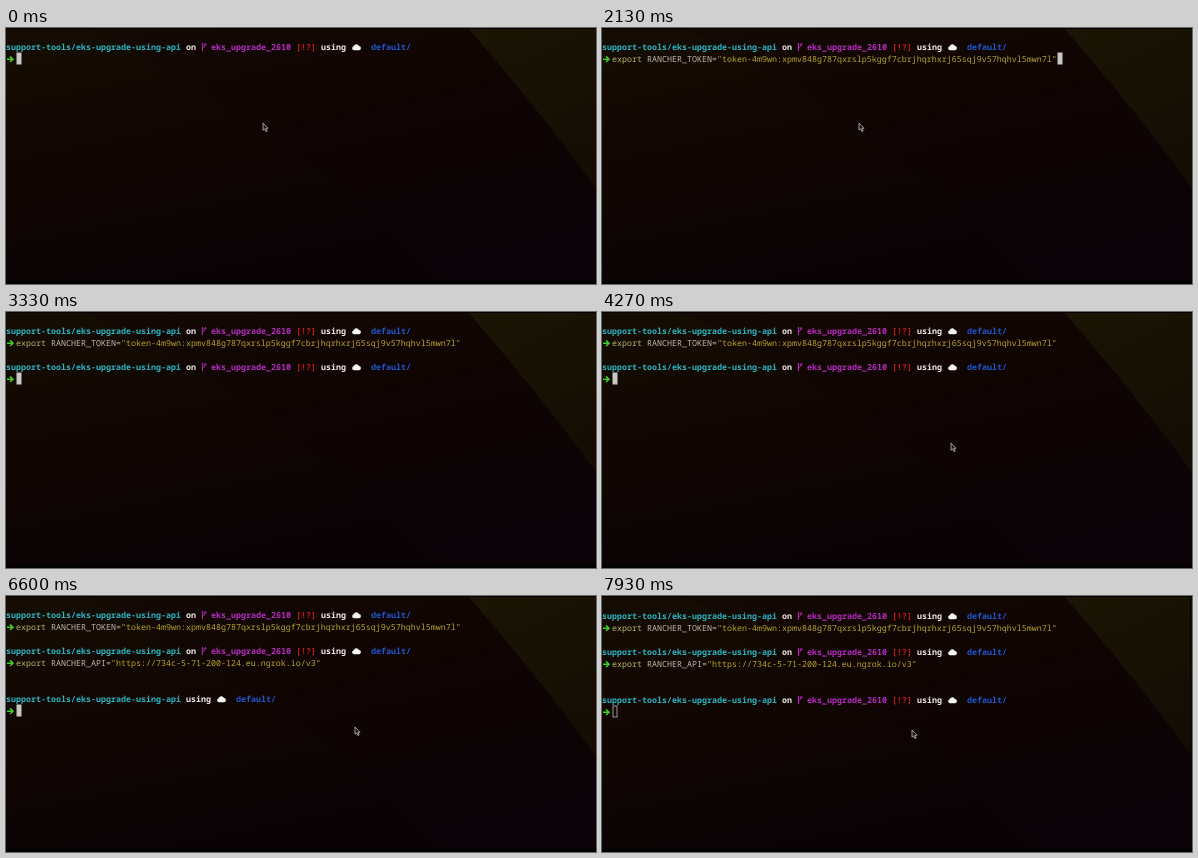
Write an HTML page that moves like this. It is 590 by 256 pixels and loops after 8 s.

```html
<!DOCTYPE html>
<html lang="en">
<head>
<meta charset="utf-8">
<title>Terminal session</title>
<style>
  html, body { margin: 0; width: 100%; height: 100%; overflow: hidden; background: #0d0403; }
  svg { display: block; width: 590px; height: 256px; }
  text {
    font: 8.333px "Noto Sans Mono", "DejaVu Sans Mono", monospace;
    text-rendering: geometricPrecision;
    white-space: pre;
    fill: #bdb6ad;
  }
  .b { font-weight: 700; }
  .dir { fill: #2ab5c4; }
  .white { fill: #eeeaea; }
  .git { fill: #b42cc0; }
  .red { fill: #bd1c16; }
  .blue { fill: #2057d0; }
  .cmd { fill: #b9b674; }
  .str { fill: #b5a52e; }
  .arrow { fill: none; stroke: #3fcf2a; stroke-width: 1.5; }
  .unfocused .arrow { stroke: #16df3a; }
</style>
</head>
<body>
<svg viewBox="0 0 590 256">
  <defs>
    <linearGradient id="left" x2=".35" y2="1">
      <stop offset="0" stop-color="#150d03"/>
      <stop offset=".45" stop-color="#110602"/>
      <stop offset="1" stop-color="#0a0305"/>
    </linearGradient>
    <linearGradient id="mid" x2=".5" y2="1">
      <stop offset="0" stop-color="#140903"/>
      <stop offset=".5" stop-color="#100403"/>
      <stop offset="1" stop-color="#0b0307"/>
    </linearGradient>
    <linearGradient id="right" x2=".4" y2="1">
      <stop offset="0" stop-color="#1a1504"/>
      <stop offset="1" stop-color="#150d04"/>
    </linearGradient>

    <text id="dir" class="b dir" x="0" y="22">support-tools/eks-upgrade-using-api</text>
    <text id="dots" class="b white" x="180" y="22">…</text>
    <g id="git">
      <text class="b white" x="180" y="22">on</text>
      <path d="M196.4 14.8V23M196.4 20.4C196.6 18.6 199.2 19.4 199.2 16.4M197.6 17.2L199.2 15.4L200.4 17.2" fill="none" stroke="#b42cc0"/>
      <text class="b git" x="205" y="22">eks_upgrade_2610</text>
    </g>
    <text id="flags" class="b red" x="290" y="22">[!?]</text>
    <g id="cloud">
      <text class="b white" x="315" y="22">using</text>
      <path d="M347.8 22.3A2.1 2.1 0 0 1 347.7 18.2A2.9 2.9 0 0 1 353 18A2.2 2.2 0 0 1 353.3 22.3Z" fill="#f4f4f4"/>
      <text class="b blue" x="365" y="22">default/</text>
    </g>
    <path id="arrow" class="arrow" d="M1 31.2H6.6M4 28.4L7 31.2L4 34"/>
  </defs>

  <rect width="590" height="256" fill="url(#mid)"/>
  <path d="M0 0H80Q287 96 435 256H0Z" fill="url(#left)"/>
  <path d="M462 0H590V160Q535 84 462 0Z" fill="url(#right)"/>
  <path d="M0 .5H590M0 254.2H590" stroke="#050102" stroke-width="1"/>
  <rect y="252.5" width="590" height="3.5" fill="#040102"/>
  <path data-show="7130 8000" d="M588.5 0V253" stroke="#070203"/>

  <g id="screen">
    <use href="#dir"/><use href="#git"/><use href="#flags"/><use href="#cloud"/>
    <use href="#arrow"/>
    <text id="token" x="10" y="34"></text>

    <g transform="translate(0 36)">
      <use href="#dir" data-show="2470 8000"/>
      <use href="#dots" data-show="2470 2670"/>
      <use href="#git" data-show="2670 8000"/>
      <use href="#flags" data-show="2800 8000"/>
      <use href="#cloud" data-show="2930 8000"/>
      <use href="#arrow" data-show="2470 8000"/>
    </g>
    <text id="api" x="10" y="70"></text>

    <g transform="translate(0 84)">
      <use href="#dir" data-show="6200 8000"/>
      <use href="#dots" data-show="6200 6530"/>
      <use href="#cloud" x="-135" data-show="6530 6670"/>
      <use href="#git" data-show="6670 8000"/>
      <use href="#flags" data-show="6670 8000"/>
      <use href="#cloud" data-show="6670 8000"/>
      <use href="#arrow" data-show="6200 8000"/>
    </g>
    <rect id="caret" width="5" height="12"/>
  </g>

  <path id="mouse" d="M0 0V7.2L1.7 5.8L2.9 8.5L4.1 8L2.9 5.3H5Z" fill="#151112" stroke="#c4c0c0" stroke-width=".8"/>
</svg>
<script>
const LOOP = 8000;
const $ = id => document.getElementById(id);
const timed = [...document.querySelectorAll("[data-show]")].map(el => [el, ...el.dataset.show.split(" ").map(Number)]);
const show = (el, on) => el.setAttribute("visibility", on ? "visible" : "hidden");

const TOKEN = ["export", " RANCHER_TOKEN=", '"token-4m9wn:xpmv848g787qxrslp5kggf7cbrjhqrhxrj65sqj9v57hqhvl5mwn7l"'];
const API = ["export", " RANCHER_API=", '"https://734c-5-71-200-124.eu.ngrok.io/v3"'];

// time, column, row, look
const CARET = [
  [0, 2, 1, "on"], [400, 2, 1, "off"], [930, 2, 1, "on"],
  [1070, 87, 1, "on"], [1130, 91, 1, "on"], [1670, 91, 1, "off"], [2130, 91, 1, "on"],
  [2330, 0, 2, "dim"], [2470, 2, 4, "on"], [2670, 2, 4, "off"], [3200, 2, 4, "on"],
  [3730, 2, 4, "off"], [4270, 2, 4, "on"], [4800, 2, 4, "off"], [5130, 2, 4, "on"],
  [5330, 0, 5, "dim"], [5930, 0, 5, "off"], [6200, 2, 8, "on"],
  [6730, 2, 8, "off"], [7130, 2, 8, "hollow"]
];

// strokes of pointer travel: start, end, from, to
const MOVES = [
  [0, 3130, 257, 95, 257, 95],
  [3130, 3330, 257, 95, 412, 40],
  [3930, 4270, 586, 247, 349, 131],
  [4270, 7130, 349, 131, 349, 131],
  [7130, 7600, 349, 131, 397, 122],
  [7600, 7800, 397, 122, 397, 122],
  [7800, 7930, 397, 122, 310, 134],
  [7930, LOOP, 310, 134, 310, 134]
];

const plain = parts => parts.join("");
const colored = ([cmd, name, str]) =>
  `<tspan class="cmd">${cmd}</tspan>${name}<tspan class="str">${str}</tspan>`;

function put(el, html) {
  if (el.shown !== html) el.innerHTML = el.shown = html;
}

function drawCaret(t) {
  const [, col, row, look] = CARET.findLast(c => c[0] <= t);
  const caret = $("caret"), hollow = look === "hollow", inset = hollow ? 0.5 : 0;
  const set = (k, v) => caret.setAttribute(k, v);
  show(caret, look !== "off");
  set("x", col * 5 + (col ? 0.5 : 0) + inset);
  set("y", 12.5 + row * 12 + inset);
  set("width", hollow ? 4 : 5);
  set("height", hollow ? 11 : 12);
  set("fill", hollow ? "none" : look === "dim" ? "#8d8988" : "#cbc7c6");
  set("stroke", hollow ? "#bdb9b8" : "none");
  set("stroke-width", 0.8);
}

function drawMouse(t) {
  const move = MOVES.find(([a, b]) => t >= a && t < b);
  show($("mouse"), move);
  if (!move) return;
  const [a, b, x0, y0, x1, y1] = move;
  const p = (t - a) / (b - a), e = p * p * (3 - 2 * p);
  $("mouse").setAttribute("transform", `translate(${x0 + (x1 - x0) * e} ${y0 + (y1 - y0) * e})`);
}

function draw(t) {
  for (const [el, from, to] of timed) show(el, t >= from && t < to);
  put($("token"), t < 1070 ? "" : t < 1130 ? plain(TOKEN).slice(0, 85) : colored(TOKEN));
  put($("api"), t < 5330 ? "" : t < 6200 ? plain(API) : colored(API));
  const away = t >= 7130;
  $("screen").setAttribute("transform", `translate(0 ${away ? 1 : 0})`);
  $("screen").classList.toggle("unfocused", away);
  drawCaret(t);
  drawMouse(t);
}

const start = performance.now();
function tick() {
  draw((performance.now() - start) % LOOP);
  requestAnimationFrame(tick);
}
draw(0);
requestAnimationFrame(tick);
</script>
</body>
</html>
```
